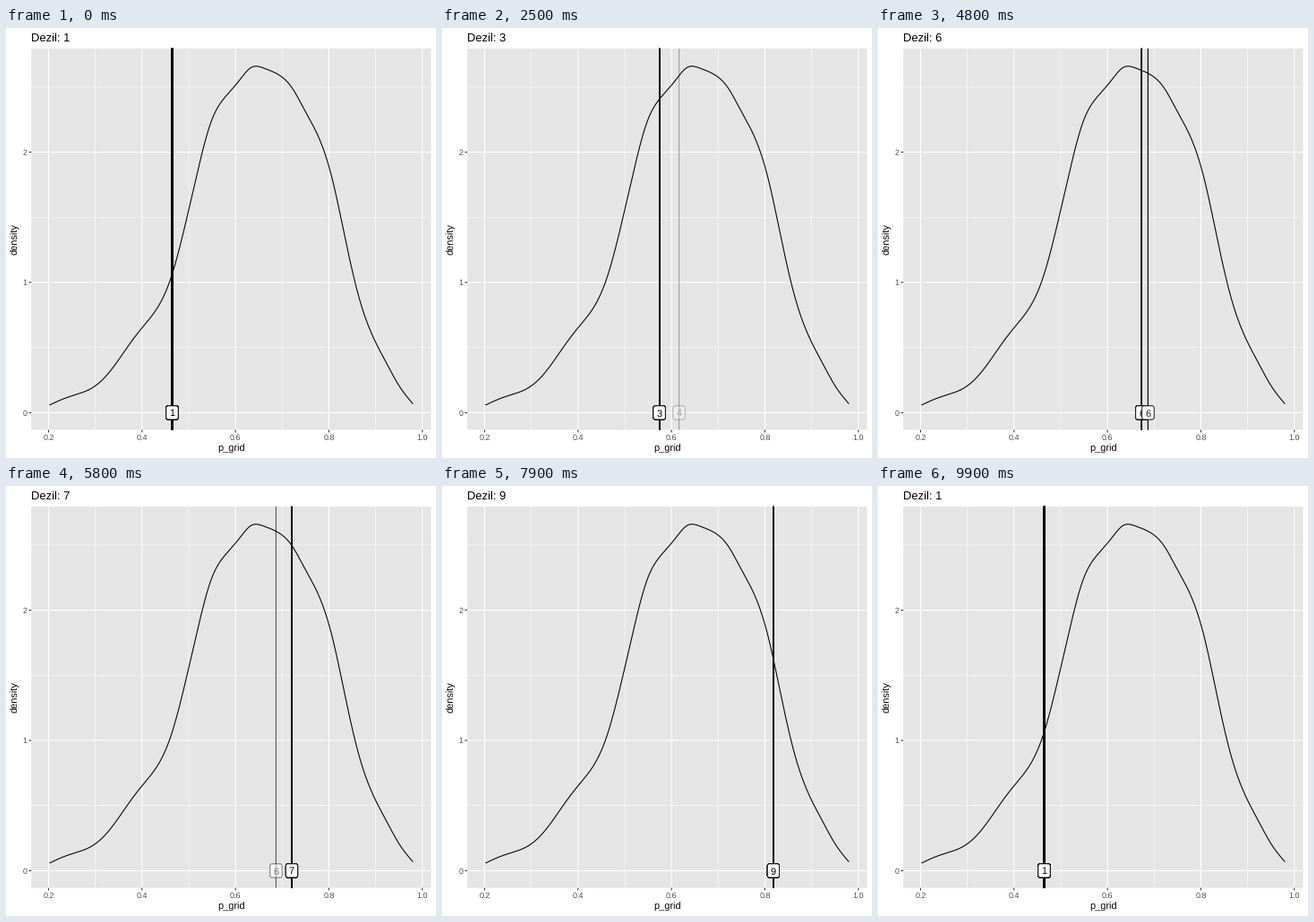
Recreate the animation shown at these times as a matplotlib script. Size 480x480 px, loop 10000 ms.

```python
import numpy as np
import matplotlib.pyplot as plt
from matplotlib.animation import FuncAnimation
from matplotlib.patches import FancyBboxPatch, Rectangle

plt.rcParams["font.family"] = ["Liberation Sans", "DejaVu Sans"]
plt.rcParams["text.hinting"] = "none"
plt.rcParams["text.hinting_factor"] = 1

SIZE, DPI, FRAMES = 480, 80, 100
PT = 72 / DPI                     # points per pixel
LEFT, RIGHT, TOP, BOTTOM = 28.25, 474.5, 22.9, 448.6
THICK, THIN, BORDER = 1.07, 0.53, 0.8
P_MIN, P_MAX = 20 / 99, 97 / 99
LABEL_COPIES = 10

# Upper decile bounds on a 100-point grid, and how many draws tie there
DECILES = np.array([46, 52, 56, 61, 64, 68, 72, 76, 81, 97]) / 99
TIES = [150, 12, 28, 30, 12, 15, 10, 18, 14, 30]

# Density at evenly spaced knots from P_MIN to P_MAX
DENSITY = np.array([
    0.058, 0.105, 0.140, 0.180, 0.259, 0.386, 0.534, 0.667, 0.802, 1.028,
    1.406, 1.849, 2.231, 2.417, 2.537, 2.651, 2.642, 2.596, 2.497, 2.314,
    2.114, 1.798, 1.323, 0.883, 0.591, 0.388, 0.202, 0.068])


def x_px(p):
    pad = 0.05 * (P_MAX - P_MIN)
    return LEFT + (p - P_MIN + pad) / (P_MAX - P_MIN + 2 * pad) * (RIGHT - LEFT)


def y_px(d):
    return 429.4 - 145.4 * d


def spline(y, t):
    """Natural cubic spline through knots at 0, 1, 2, ..., evaluated at t."""
    n = len(y)
    a = 4 * np.eye(n - 2) + np.eye(n - 2, k=1) + np.eye(n - 2, k=-1)
    m = np.pad(np.linalg.solve(a, 6 * np.diff(y, 2)), 1)
    i = np.minimum(t.astype(int), n - 2)
    v = t - i
    u = 1 - v
    return (u * y[i] + v * y[i + 1]
            + ((u**3 - u) * m[i] + (v**3 - v) * m[i + 1]) / 6)


fig = plt.figure(figsize=(SIZE / DPI, SIZE / DPI), dpi=DPI, facecolor="white")
ax = fig.add_axes([0, 0, 1, 1])
ax.set(xlim=(0, SIZE), ylim=(SIZE, 0))
ax.axis("off")
ax.autoscale(False)


def line(xs, ys, width, color, z=2):
    ax.plot(xs, ys, color=color, lw=width * PT, zorder=z, snap=False,
            solid_capstyle="butt")


def text(x, y, s, size, color="black", **kw):
    kw = {"ha": "center", "va": "baseline", **kw}
    return ax.text(x, y, s, fontsize=size * PT, color=color, **kw)


def draw_plot():
    ax.add_patch(Rectangle((LEFT, TOP), RIGHT - LEFT, BOTTOM - TOP,
                           fc="#e5e5e5", ec="none", zorder=0, snap=False))
    for v in (0.3, 0.5, 0.7, 0.9):
        line([x_px(v)] * 2, [TOP, BOTTOM], THIN, "white", 1)
    for v in (0.5, 1.5, 2.5):
        line([LEFT, RIGHT], [y_px(v)] * 2, THIN, "white", 1)
    for v in (0.2, 0.4, 0.6, 0.8, 1.0):
        x = x_px(v)
        line([x, x], [TOP, BOTTOM], THICK, "white")
        line([x, x], [BOTTOM, BOTTOM + 2.75], THICK, "#333333")
        text(x, 460, f"{v:.1f}", 8.8, "#4d4d4d")
    for v in (0, 1, 2):
        y = y_px(v)
        line([LEFT, RIGHT], [y, y], THICK, "white")
        line([LEFT - 2.75, LEFT], [y, y], THICK, "#333333")
        text(23.2, y + 3.2, str(v), 8.8, "#4d4d4d", ha="right")
    t = np.linspace(0, len(DENSITY) - 1, 500)
    line(x_px(np.linspace(P_MIN, P_MAX, 500)), y_px(spline(DENSITY, t)),
         THICK, "black", 3)
    text(251.6, 473, "p_grid", 11)
    text(15.8, 235.8, "density", 11, rotation=90, va="center", ha="right")


draw_plot()
title = text(28, 15, "", 13.2, ha="left")
moving = []


def draw_rows(x, name, count, alpha, z):
    """Overlapping marker lines and labels, one per tied draw."""
    if count == 0 or alpha <= 0:
        return
    rules = ax.vlines([x] * count, TOP, BOTTOM, colors="black",
                      lw=THICK * PT, alpha=alpha, zorder=4)
    rules.set_snap(False)
    moving.append(rules)
    w, h, y = 7.2 + 6.1 * len(name), 15.1, y_px(0)
    for i in range(min(count, LABEL_COPIES)):
        box = FancyBboxPatch((x - w / 2, y - h / 2), w, h,
                             boxstyle="round,pad=0,rounding_size=2.2",
                             fc="white", ec="black", lw=BORDER * PT,
                             alpha=alpha, zorder=z + i / 50, snap=False)
        ax.add_patch(box)
        moving.append(box)
        moving.append(text(x, y + 4, name, 11, alpha=alpha,
                           zorder=z + i / 50 + 0.01))


def arrival(k):
    """Frame on which the k-th move ends."""
    return int(9.9 * k + 0.5)


def pose(frame):
    """Decile left, decile approached and progress between them."""
    for k in range(10):
        if frame < arrival(k + 1) or k == 9:
            steps = 6 if k else 7
            p = (frame - arrival(k + 1) + steps) / steps
            return k, (k + 1) % 10, min(1, max(0, p))


def draw(frame):
    while moving:
        moving.pop().remove()
    a, b, p = pose(frame)
    xa, xb = x_px(DECILES[a]), x_px(DECILES[b])
    near = str((b if p >= 0.5 else a) + 1)
    title.set_text("Dezil: " + near)

    # Paired rows slide; surplus rows fade in or out where they stand
    draw_rows(xa + (xb - xa) * p, near, min(TIES[a], TIES[b]), 1, 5)
    extra = TIES[b] - TIES[a]
    if extra > 0:
        draw_rows(xb, str(b + 1), extra, p, 6)
    else:
        draw_rows(xa, str(a + 1), -extra, 1 - p, 6)
    return moving


anim = FuncAnimation(fig, draw, frames=FRAMES, interval=100, repeat=True,
                     repeat_delay=0, blit=False)
plt.show()
```
